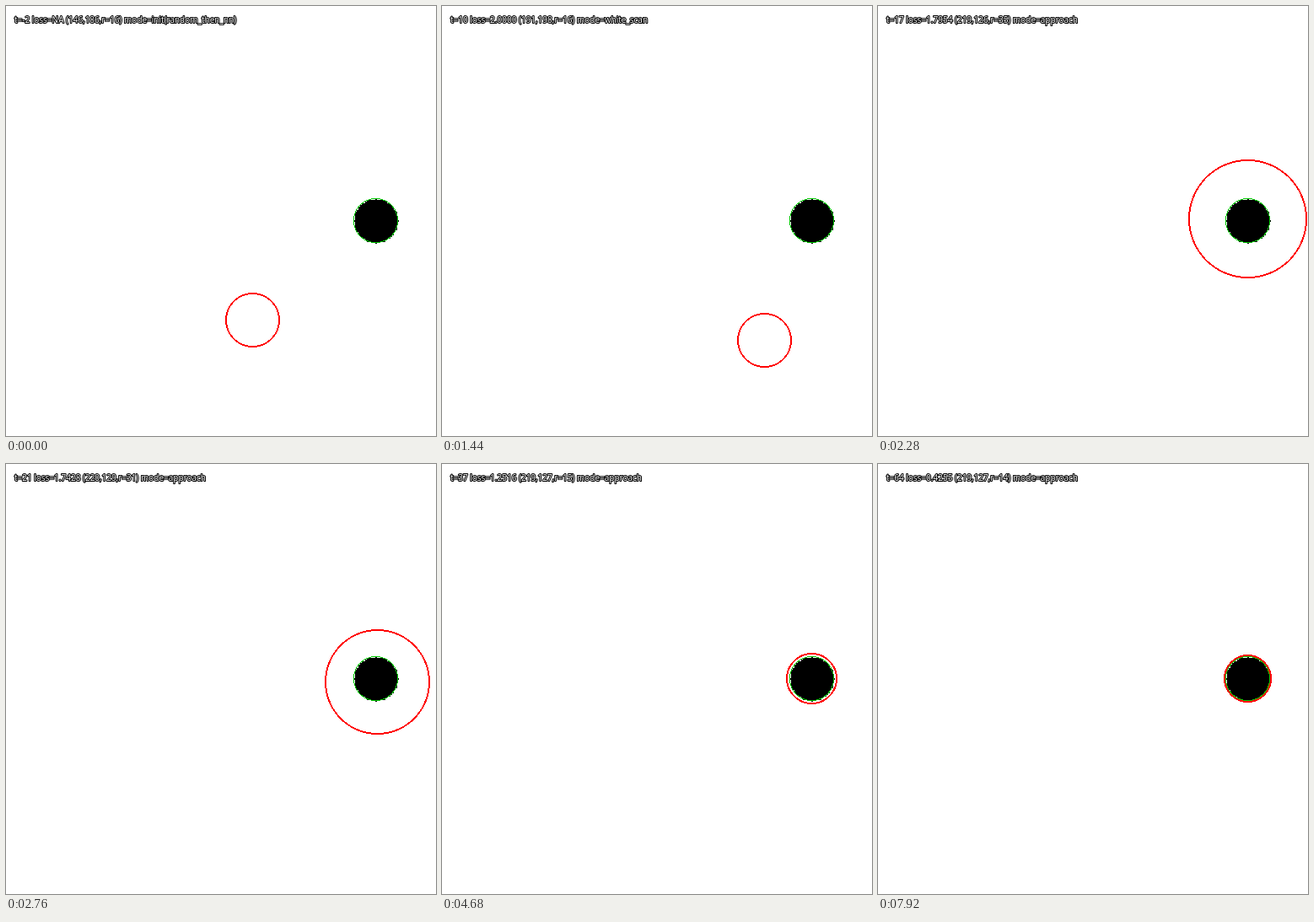
Recreate the animation shown at these times as an HTML page with a canvas. Size 510 px wide and 510 px high, loop 8000 ms.

```html
<!DOCTYPE html>
<html lang="en">
<head>
<meta charset="utf-8">
<title>Circle search</title>
<style>
  html, body { margin: 0; width: 100%; height: 100%; overflow: hidden; background: #fff; }
  canvas { display: block; }
</style>
</head>
<body>
<canvas id="stage" width="510" height="510"></canvas>
<script>
const ctx = document.getElementById('stage').getContext('2d');
const LOOP = 8000, STEP = 120, SCALE = 2, GRID = 255;
const TARGET = { x: 219, y: 127, r: 13 };
const SCAN_RADIUS = 16, APPROACH_START = 12, FINAL_RADIUS = 14, FINAL_LOSS = 0.4255;

// Calls visit(dx, dy) for every cell of a square around the origin.
function eachCell(reach, visit) {
  for (let dy = -reach; dy <= reach; dy++) {
    for (let dx = -reach; dx <= reach; dx++) visit(dx, dy);
  }
}

const inDisc = (dx, dy, r) => dx * dx + dy * dy <= r * r;

function discArea(r) {
  let cells = 0;
  eachCell(r, (dx, dy) => { cells += inDisc(dx, dy, r); });
  return cells;
}

// Scanning moves in a straight line and bounces off the walls.
function scan(step) {
  const wall = GRID - SCAN_RADIUS, elapsed = step + 2;
  const bounce = v => Math.round(wall - Math.abs(wall - v));
  return {
    x: bounce(146 + elapsed * 11.714),
    y: bounce(186 + elapsed * 7.857),
    r: SCAN_RADIUS,
    loss: step < 0 ? 'NA' : '2.0000',
    mode: step < 0 ? 'init(random_then_nn)' : 'white_scan'
  };
}

// Approaching shrinks by one cell per step and settles like a damped spring.
function approach(step) {
  const elapsed = step - 13;
  const offset = Math.exp(-0.28 * elapsed) * Math.cos(elapsed * Math.PI / 8.5);
  const r = Math.max(FINAL_RADIUS, 52 - step);
  const white = 1 - discArea(TARGET.r) / discArea(r);
  const loss = r === FINAL_RADIUS ? FINAL_LOSS : 1.2 + 0.8 * white * white;
  return {
    x: Math.round(TARGET.x - 9 * offset),
    y: Math.round(TARGET.y - 19 * offset),
    r,
    loss: loss.toFixed(4),
    mode: 'approach'
  };
}

function disc({ x, y, r }) {
  ctx.fillStyle = '#000';
  eachCell(r, (dx, dy) => {
    if (inDisc(dx, dy, r)) ctx.fillRect((x + dx) * SCALE, (y + dy) * SCALE, SCALE, SCALE);
  });
}

// Hard-edged ring whose borders follow the midpoint circle rule.
function ring({ x, y, r }, width, color) {
  const outer = r * SCALE, inner = outer - width + 1;
  ctx.fillStyle = color;
  eachCell(outer, (dx, dy) => {
    const d = dx * dx + dy * dy, major = Math.max(Math.abs(dx), Math.abs(dy));
    if (d - major <= outer * outer && d + major >= inner * inner) {
      ctx.fillRect(x * SCALE + dx, y * SCALE + dy, 1, 1);
    }
  });
}

function label(text) {
  ctx.font = '10px "Open Sans", sans-serif';
  ctx.lineJoin = 'round';
  ctx.lineWidth = 2;
  ctx.strokeStyle = '#000';
  ctx.fillStyle = '#fff';
  ctx.strokeText(text, 10, 20);
  ctx.fillText(text, 10, 20);
}

function draw(step) {
  const s = step < APPROACH_START ? scan(step) : approach(step);
  ctx.fillStyle = '#fff';
  ctx.fillRect(0, 0, GRID * SCALE, GRID * SCALE);
  disc(TARGET);
  ring(TARGET, 1, '#00c800');
  ring(s, 2, '#f00');
  label(`t=${step} loss=${s.loss} (${s.x},${s.y},r=${s.r}) mode=${s.mode}`);
}

const start = performance.now();
function tick() {
  const time = (performance.now() - start) % LOOP;
  draw(Math.floor(time / STEP) - 2);
  requestAnimationFrame(tick);
}
tick();
</script>
</body>
</html>
```
